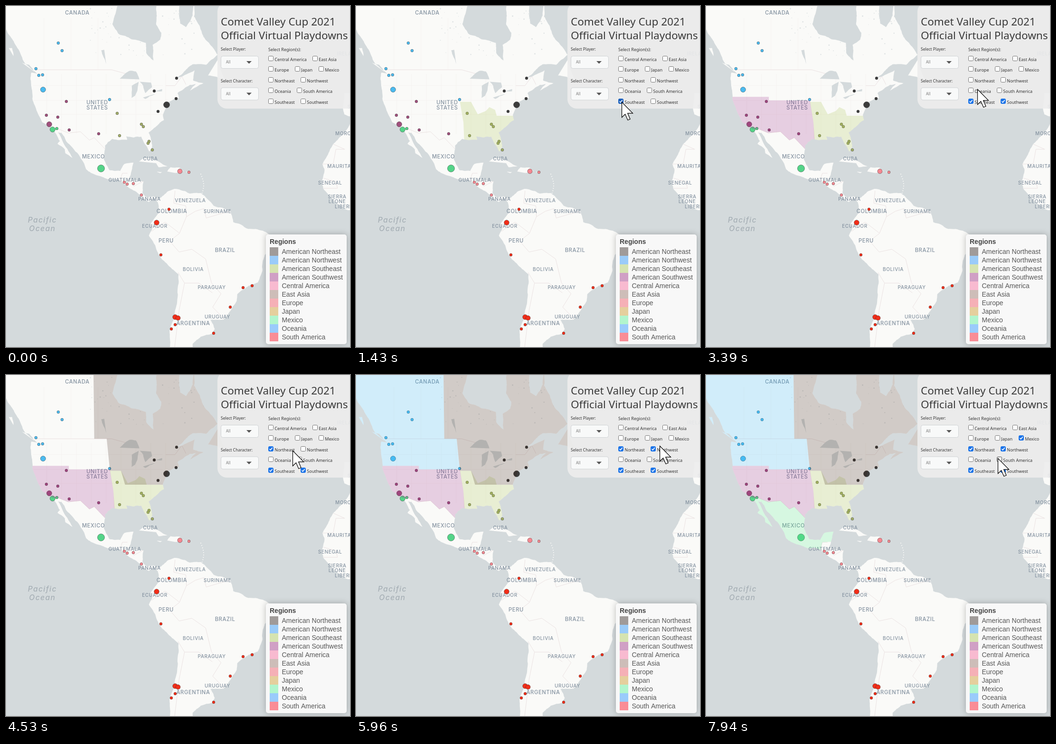
These frames come from a looping animation (724x718 px, 8000 ms). An HTML page with a canvas:

```html
<!DOCTYPE html>
<html lang="en">
<head>
<meta charset="utf-8">
<title>Qualifier map</title>
<style>
html, body { margin: 0; width: 100%; height: 100%; overflow: hidden; background: #d4dadc; }
canvas { display: block; }
</style>
</head>
<body>
<canvas id="stage" width="724" height="718"></canvas>
<script>
const W = 724, H = 718, LOOP = 8000;
const WATER = '#d4dadc', LAND = '#fafaf8';
const SMALL = '9px "Noto Sans", sans-serif';
const stage = document.getElementById('stage').getContext('2d');
const base = document.createElement('canvas');
base.width = W;
base.height = H;
let g = base.getContext('2d');

let seed = 9;
const rand = () => (seed = seed * 16807 % 2147483647) / 2147483647;

// Key points of the coasts as "west-longitude latitude"; roughen() adds the detail.
const westCoast = '140 63,140 59.8,134.5 58.2,130.2 54.4,127.5 51,122.5 48,124.7 48.3,124.3 41.5,122.5 37.7,120.6 34.6,117.2 32.8,' +
  '114.1 28.7,115 27.8,112.3 26,112.1 24.7,109.5 23.1,111.4 26.2,114.8 31.5,113.5 31.3,109.4 26.5,105.4 21.6,104.4 19.2,' +
  '96.5 15.7,93.8 15.9,90 13.8,85.8 11.1,83.6 8.9,81.2 7.4,79.5 8.9,77.9 7.3,';
const eastCoast = '77.3 8.6,79.5 9.5,82.3 9.3,83.6 10.9,83.2 14.9,88.6 15.8,86.9 21.5,90.3 21,91.8 18.6,95.8 18.9,97.8 22.5,' +
  '97.4 27.2,94.7 29.4,89.2 29.1,89.6 30.2,84 30.1,82.7 27.7,81 25.2,80 26.8,81.3 31.4,75.6 35.3,76 36.9,74 40.6,70 41.7,' +
  '70.6 43,66 45.2,63.8 45.4,66 43.7,61 45.6,64.8 46.3,64.3 48.9,71 46.9,65 50.3,60 50.2,55.8 52.5,61.5 57,64.5 60.3,64.5 63';
const southAmerica = '77.3 8.6,74.2 11.3,71.7 12.2,70 12,66 10.5,62 10.7,57.2 6,51 4,50 0,44.5 -2.5,39 -3.2,35.3 -5.3,34.8 -7.5,' +
  '39 -14,39.2 -17.8,40.9 -21.8,44.6 -23.2,48.5 -25.8,48.7 -28,53.5 -33.9,58.4 -34,56.8 -36.8,57.7 -38.1,62 -39,65 -41,64 -44,' +
  '74 -44,73.5 -37,71.5 -31,70.2 -19,76.3 -13.7,79.9 -6.8,81.2 -5,79.9 -2.4,80.5 -.5,77.2 3.8,77.9 7.3';
const africa = '5.9 35.8,9.8 30.5,13 27.7,17 21,16.2 19,17.4 14.7,16.7 12.3,13 8,7.5 4.4,0 4.4,0 36';
const islands = [
  '59.3 47.6,53.2 46.7,55.6 51.5', '128.2 50.7,125.5 50.2,123.5 48.5', '133 54,131.8 54,131.3 52.2',
  '84.9 21.9,83 23,80.5 23.1,74.3 20.2,77.6 19.9,78.5 21.3', '74.4 18.4,73.2 19.9,70 19.8,68.4 18.6,71.5 17.9',
  '78.3 18.3,76.3 18.2,77 17.8', '67.2 18.4,65.7 18.3,67.2 18', '8.9 43,9.4 38.7,8.9 37,6 36.1,0 43'
];
const bays = [
  '92.5 63,94.7 58.9,92.5 57,82.3 55.1,82.2 53,79.5 51.2,79.8 54.7,77 55.8,76.6 57.2,78.5 58.8,78 63',
  '70 63,69.6 59,67.5 58.3,65 60.5,64.8 63'
];
const lakes = [
  '92 46.8,88.5 48.7,86 48.6,84.7 46.6', '87.6 41.7,87.5 45,85 46,86.3 42.3', '84.6 46,83.3 45,82.5 43,80 44.6,80.4 45.8',
  '83.4 41.8,82.5 41.4,78.9 42.8', '79.7 43.3,76.3 43.5,76.3 44.1', '97 50.4,98.8 53.5,97.7 53.6'
];
const usMexico = '117.1 32.5,114.8 32.6,111 31.3,106.5 31.7,103.2 29,101.4 29.8,97.2 25.9';
const borders = [
  usMexico, '123 49,95 49,89.5 48', '75 45,71.5 45,69 47.4,67.5 45.3', '92.2 14.5,91 17.8,89.1 17.8', '87 13,83.2 15',
  '71.5 11.5,72 7,67.5 6,67.3 2,69.9 -4.2,73.5 -7,70 -11,65.3 -10,60.2 -13.5,58 -22,54.5 -25.6,57.6 -30,53.4 -33.7',
  '67.3 2,64 4,60.8 5,60 1.5,51.5 4', '80.2 -3.4,75.2 0,70 -4', '70.4 -18.3,68 -22,70 -31,72 -44', '68 -22,62.7 -22,57.7 -25.3',
  '13 27.7,8.7 26,12 26,13 21,17 21', '16.5 16,12 14.8,11.4 12.4,16.7 12.4'
];

// Time of the click, tint, outline (clipped to the land)
const regions = [
  ['Southeast', 1240, 'rgba(160,190,60,.2)', '95.6 40.6,91.5 40.6,89 37,86 38,84.7 39.1,82.6 38.3,82 36.6,74 36.6,74 24,93.8 24,94.3 34.6'],
  ['Southwest', 2750, 'rgba(150,30,128,.2)', usMexico + ',93.8 28,94.3 34.6,95.6 41,110.8 41,110.8 42,125 42,125 32.5'],
  ['Northeast', 4060, 'rgba(45,15,0,.2)', '101.7 63,101.4 49,96.8 49,95.6 40.6,91.5 40.6,90 36.6,53 36.6,53 63'],
  ['Northwest', 5530, 'rgba(45,187,255,.2)', '140 63,101.7 63,101.4 49,96.8 49,95.7 41,110.8 41,110.8 42,140 42'],
  ['Mexico', 6710, 'rgba(70,235,130,.2)', usMexico + ',87 25,86 18,91 17.8,92.2 13,123 13,123 32.5']
].map(([name, at, color, outline]) => ({ name, at, color, path: pathOf([outline]) }));

const dots = {
  '#4bbbf0': '110,78 118,94 63,132 69,146 77,145 78,176,5.5 218,197',
  '#3c3c3c': '359,152 312,179 358,195 338,208,6.5 320,222',
  '#a04f7c': '127,201 85,230 109,234 91,249,5.5 133,261 195,269',
  '#a3ae69': '234,226 239,273 285,249 289,254 301,285 299,289 308,303',
  '#54d488': '98,260,5.5 107,258 200,342,7.5',
  '#f58891': '249,371 255,375 268,374 285,398 366,348,5 385,350',
  '#f22d18': '343,428 317,456,5.3 326,524 518,589 499,593 472,634 356,655,5.3 362,657,5 356,671 348,680 437,689'
};
const bigPlaces = 'CANADA 150 14,UNITED 192 203,STATES 192 214,MEXICO 184 317,COLOMBIA 349 432,PERU 337 494,BRAZIL 461 514,ARGENTINA 394 668';
const smallPlaces = 'GUATEMALA 250 366,CUBA 304 321,PANAMA 302 406,VENEZUELA 388 409,SURINAME 445 432,ECUADOR 313 463,' +
  'BOLIVIA 394 554,PARAGUAY 433 592,URUGUAY 445 654,MOROCCO 722 268,MAURITANIA 711 337,SENEGAL 682 372,' +
  'SIERRA 697 401,LEONE 697 411,LIBERIA 713 422,SPAIN 735 212,IRELAND 720 100';

const boxRows = ['Central America,East Asia', 'Europe,Japan,Mexico', 'Northeast,Northwest', 'Oceania,South America', 'Southeast,Southwest'];
const legend = {
  'American Northeast': '#a09b99', 'American Northwest': '#9acbf9', 'American Southeast': '#d5e3b1',
  'American Southwest': '#d0a0c5', 'Central America': '#f8bad0', 'East Asia': '#cdbdb8', 'Europe': '#f5b0b6',
  'Japan': '#e5cf9d', 'Mexico': '#b1f5cd', 'Oceania': '#9acbfb', 'South America': '#f98d96'
};

// Pointer moves: start, end, x, y, bow
const moves = [
  [70, 820, 559, 202, 0], [1500, 1890, 637, 202, -30], [2030, 2490, 627, 202, 0], [2950, 3730, 558, 154, 19],
  [4300, 4800, 622, 159, 2], [5140, 5330, 627, 152, 0], [5845, 6580, 667, 131, 4], [7000, 7560, 556, 160, -40], [7600, 7940, 614, 175, 0]
];

function points(s) {
  return s.split(',').map(p => {
    const [w, lat] = p.split(' ').map(Number);
    return [762.6 - 5.689 * w, 455 - 326 * Math.log(Math.tan(Math.PI / 4 + lat * Math.PI / 360))];
  });
}
// Midpoint displacement: returns the points after a, up to b.
function roughen(a, b) {
  const dx = b[0] - a[0], dy = b[1] - a[1];
  if (Math.hypot(dx, dy) < 5) return [b];
  const k = (rand() - .5) * .13;
  const mid = [(a[0] + b[0]) / 2 - dy * k, (a[1] + b[1]) / 2 + dx * k];
  return [...roughen(a, mid), ...roughen(mid, b)];
}
function pathOf(list, { rough = false, open = false } = {}) {
  const path = new Path2D();
  for (const s of list) {
    let pts = points(s);
    if (rough) pts = pts.flatMap((p, i) => i ? roughen(pts[i - 1], p) : [p]);
    pts.forEach(([x, y], i) => i ? path.lineTo(x, y) : path.moveTo(x, y));
    if (!open) path.closePath();
  }
  return path;
}
const land = pathOf([westCoast + eastCoast, southAmerica, africa, ...islands, ...bays], { rough: true });

function text(s, x, y, font, color, align = 'left', spacing = 0) {
  g.font = font;
  g.fillStyle = color;
  g.textAlign = align;
  g.letterSpacing = spacing + 'px';
  g.fillText(s, x, y);
}
function disc(x, y, r, color) {
  g.beginPath();
  g.arc(x, y, r, 0, 7);
  g.fillStyle = color;
  g.fill();
}
function box(x, y, w, h, r, fill, line) {
  g.beginPath();
  g.roundRect(x, y, w, h, r);
  g.fillStyle = fill;
  g.fill();
  g.lineWidth = 1;
  if (line) { g.strokeStyle = line; g.stroke(); }
}
function stroke(path, color, width) {
  g.strokeStyle = color;
  g.lineWidth = width;
  g.stroke(path);
}

function drawLabels(list, size) {
  const font = `500 ${size}px Inter, sans-serif`;
  for (const item of list.split(',')) {
    const [name, x, y] = item.split(' ');
    text(name, +x, +y + 4.4, font, '#8593a1', 'center', .6);
  }
}
function drawMap() {
  g.fillStyle = WATER;
  g.fillRect(0, 0, W, H);
  g.fillStyle = LAND;
  g.fill(land, 'evenodd');
  for (let i = 0; i < 9; i++) disc(410 + 6 * Math.sin(i / 3), 354 + 5 * i, 1, LAND);

  g.save();
  g.clip(land, 'evenodd');
  const grid = [];
  for (let w = 75; w < 120; w += 5.5) grid.push(`${w} 48,${w} 31`);
  for (let w = 100; w < 125; w += 10) grid.push(`${w} 60,${w} 49`);
  for (const lat of [37, 41, 45]) grid.push(`124 ${lat},76 ${lat}`);
  stroke(pathOf(grid, { open: true }), '#f5f3f1', 1);
  stroke(pathOf(borders, { open: true }), '#ebe2e2', 1);
  for (let i = 0; i < 70; i++) disc(170 + rand() * 250, rand() * 105, .5 + rand(), '#dfe3e4');
  g.restore();
  g.fillStyle = WATER;
  g.fill(pathOf(lakes, { rough: true }));

  drawLabels(bigPlaces, 11.2);
  drawLabels(smallPlaces, 10.1);
  ['Pacific', 'Ocean'].forEach((s, i) =>
    text(s, 76.5, 456 + 18 * i, 'italic 500 15.5px Inter, sans-serif', '#a7b0b6', 'center', 1.4));

  for (const color in dots) {
    for (const dot of dots[color].split(' ')) {
      const [x, y, r = 2.9] = dot.split(',').map(Number);
      disc(x, y, r, color);
      g.strokeStyle = 'rgba(50,50,50,.6)';
      g.lineWidth = .8;
      g.stroke();
    }
  }
}

function drawCheckbox(x, y, on, hover) {
  const blue = hover ? '#1a5fbd' : '#1a73e8';
  box(x + .5, y + .5, 10, 10, 2, on ? blue : '#fff', on ? blue : hover ? '#444' : '#767676');
  if (on) stroke(new Path2D(`M${x + 2.5} ${y + 5.8}l2.1 2.2 4.1 -5`), '#fff', 1.6);
}
function drawPanel(t, cx, cy) {
  box(445, -8, 400, 224, 20, 'rgba(238,238,238,.9)');
  ['Comet Valley Cup 2021', 'Official Virtual Playdowns'].forEach((s, i) =>
    text(s, 452, 41 + 29 * i, '22.5px "Noto Sans", sans-serif', '#3a3a3a'));
  text('Select Region(s):', 552, 95, SMALL, '#333');
  ['Select Player:', 'Select Character:'].forEach((s, i) => {
    const y = 94 + 66.5 * i;
    text(s, 452, y, '8.5px "Noto Sans", sans-serif', '#333');
    box(452.5, y + 11.5, 79, 26, 4, '#f8f9f9', '#d0d3d5');
    text('All', 463, y + 27, '8px "Noto Sans", sans-serif', '#777');
    g.fillStyle = '#555';
    g.fill(new Path2D(`M506 ${y + 22}h11l-5.5 5.5z`));
  });
  boxRows.forEach((row, i) => {
    let x = 552;
    const y = Math.floor(105 + 22.5 * i);
    for (const label of row.split(',')) {
      const region = regions.find(r => r.name === label);
      const hover = cx >= x && cx < x + 12 && cy >= y && cy < y + 12;
      drawCheckbox(x, y, region && t >= region.at - 260, hover);
      text(label, x + 13.3, y + 10.5, SMALL, '#333');
      x = Math.round(x + 26 + g.measureText(label).width);
    }
  });
}

function drawLegend() {
  g.save();
  g.shadowColor = 'rgba(0,0,0,.25)';
  g.shadowBlur = 13;
  box(547, 481, 170, 231, 5, '#f8f8f8');
  g.restore();
  text('Regions', 555, 501, 'bold 14px "Liberation Sans", Arial, sans-serif', '#444');
  Object.entries(legend).forEach(([name, color], i) => {
    g.fillStyle = color;
    g.fillRect(555, 508 + 18 * i, 18, 18);
    text(name, 580.5, 522 + 18 * i, '14px "Liberation Sans", Arial, sans-serif', '#555');
  });
}

function cursorAt(t) {
  let x = 670, y = 639;
  for (const [t0, t1, x1, y1, bow] of moves) {
    if (t < t0) break;
    const f = Math.min(1, (t - t0) / (t1 - t0));
    const e = 1 - (1 - f) ** 2;
    x += (x1 - x) * e;
    y += (y1 - y) * e + bow * 4 * e * (1 - e);
  }
  return [Math.round(x), Math.round(y)];
}
const arrow = new Path2D('M.5 .5V32.5L7.5 25.7 13 38.3 18 36.2 12.7 23.8H23.5Z');
function drawCursor(x, y) {
  g.save();
  g.translate(x, y);
  g.fillStyle = '#fff';
  g.fill(arrow);
  stroke(arrow, '#000', 1.2);
  g.restore();
}

function draw(t) {
  const [cx, cy] = cursorAt(t);
  g.drawImage(base, 0, 0);
  g.save();
  g.clip(land, 'evenodd');
  for (const r of regions) {
    if (t < r.at) continue;
    g.fillStyle = r.color;
    g.fill(r.path);
  }
  g.restore();
  drawPanel(t, cx, cy);
  drawLegend();
  if (t >= 70) drawCursor(cx, cy);
}

drawMap();
g = stage;
const start = performance.now();
function tick() {
  draw((performance.now() - start) % LOOP);
  requestAnimationFrame(tick);
}
tick();
</script>
</body>
</html>
```
